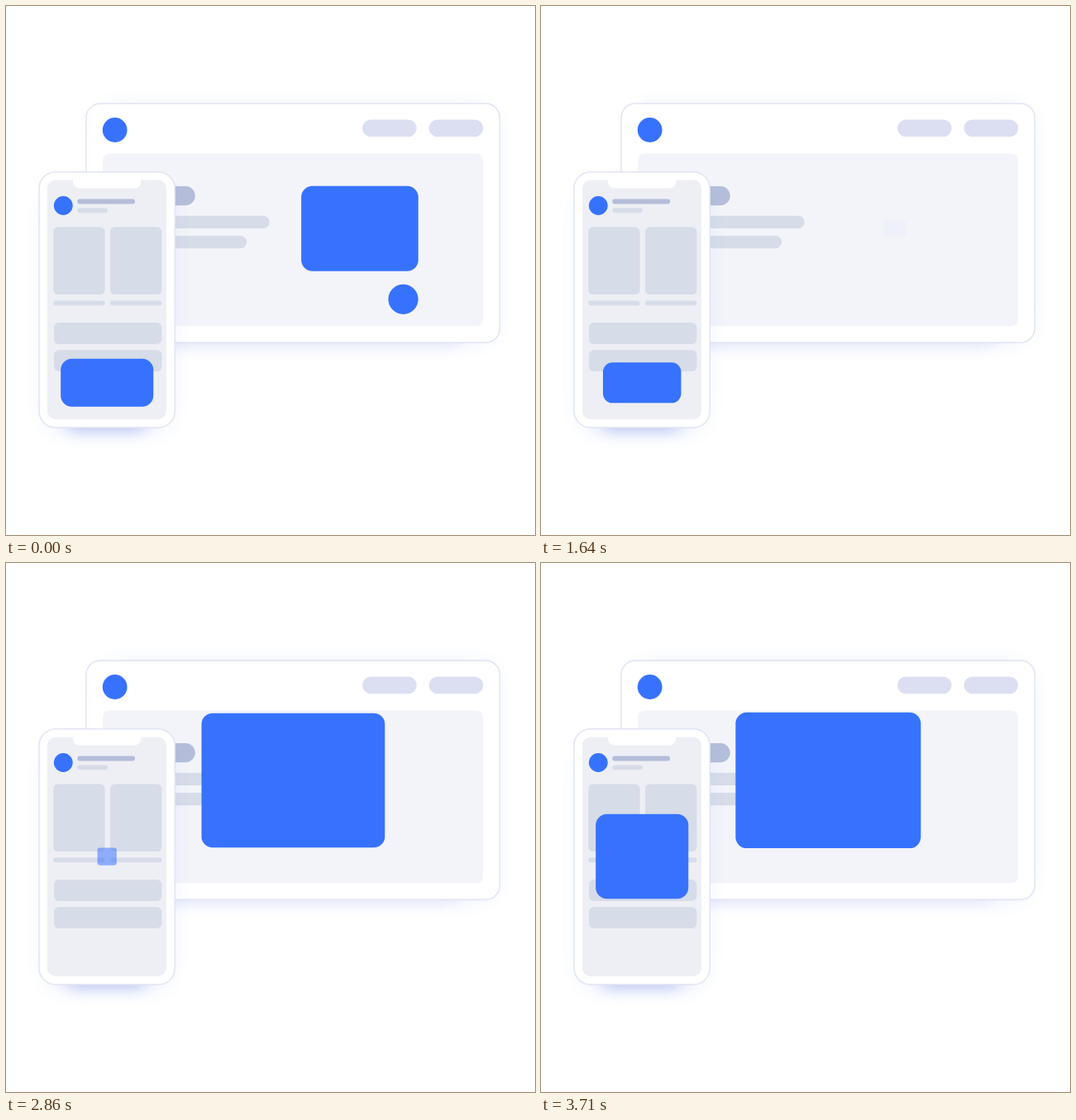
An HTML page for the animation above (8 s loop, 640x640 px).

```html
<!DOCTYPE html>
<html lang="en">
<head>
<meta charset="utf-8">
<title>Responsive widgets</title>
<style>
  html, body { margin: 0; width: 100%; height: 100%; overflow: hidden; background: #fff; }
  svg { display: block; width: 100%; height: 100%; }
  .blue { fill: #3772ff; }
  .dark { fill: #b4bdd9; }
  .mid { fill: #d6dce8; }
  .pill { fill: #dcdff1; }
  .frame { fill: #fff; stroke: #e1e4f4; stroke-width: 1.5; }
</style>
</head>
<body>
<svg viewBox="0 0 640 640">
  <defs>
    <filter id="soft" x="-30%" y="-30%" width="160%" height="160%"><feGaussianBlur stdDeviation="12"/></filter>
    <filter id="near" x="-60%" y="-100%" width="220%" height="300%"><feGaussianBlur stdDeviation="9"/></filter>
  </defs>

  <g id="browser">
    <rect x="110" y="122" width="482" height="284" rx="30" fill="#3d6fe8" opacity=".13" filter="url(#soft)"/>
    <rect x="150" y="385" width="400" height="26" rx="13" fill="#4a62d8" opacity=".1" filter="url(#near)"/>
    <rect class="frame" x="97" y="118" width="500.3" height="289.2" rx="17"/>
    <circle class="blue" cx="131.7" cy="150" r="14.9"/>
    <rect class="pill" x="431.2" y="137.5" width="65.6" height="20.7" rx="10.3"/>
    <rect class="pill" x="511.7" y="137.5" width="65.6" height="20.7" rx="10.3"/>
    <rect x="117" y="178.4" width="460.3" height="208.9" rx="8" fill="#f3f4fa"/>
    <rect class="dark" x="157" y="218" width="71.8" height="23.2" rx="11.6"/>
    <rect class="mid" x="157" y="253.8" width="161.8" height="15.2" rx="7.6"/>
    <rect class="mid" x="157" y="278" width="134.2" height="15.2" rx="7.6"/>
  </g>
  <g id="browserWidgets"></g>

  <g id="phone">
    <rect x="48" y="222" width="150" height="292" rx="28" fill="#3d6fe8" opacity=".14" filter="url(#soft)"/>
    <rect x="74" y="490" width="94" height="24" rx="12" fill="#4a62d8" opacity=".3" filter="url(#near)"/>
    <rect class="frame" x="40" y="200.7" width="164.3" height="309.4" rx="20"/>
    <rect x="50" y="210.5" width="144" height="289.5" rx="10" fill="#eeeff5"/>
    <path d="M81 209.5H163.3V212.5a8 8 0 0 1-8 8H89a8 8 0 0 1-8-8Z" fill="#fff"/>
    <circle class="blue" cx="69.3" cy="241.5" r="11.4"/>
    <rect class="dark" x="86.3" y="233.5" width="69.8" height="6" rx="3"/>
    <rect class="mid" x="86.3" y="244.4" width="36.7" height="5.8" rx="2.9"/>
    <rect class="mid" x="57.3" y="267.6" width="62.3" height="81.5" rx="5.5"/>
    <rect class="mid" x="126.1" y="267.6" width="62.4" height="81.5" rx="5.5"/>
    <rect class="mid" x="57.3" y="356.5" width="62.3" height="5.8" rx="2.9"/>
    <rect class="mid" x="126.1" y="356.5" width="62.4" height="5.8" rx="2.9"/>
    <rect class="mid" x="58" y="383" width="130.5" height="26" rx="6"/>
    <rect class="mid" x="58" y="416.2" width="130.5" height="25.8" rx="6"/>
  </g>
  <g id="phoneWidgets"></g>
</svg>

<script>
const LOOP = 8000;

// Smooth 0..1 progress of t between start and end.
function ease(t, start, end) {
  const p = Math.min(1, Math.max(0, (t - start) / (end - start)));
  return p * p * (3 - 2 * p);
}

// Swell from 1 to the peak, then shrink away while fading.
function leave(swell, shrink, gone, peak, fade) {
  return t => ({
    scale: (1 + (peak - 1) * ease(t, swell, shrink)) * (1 - ease(t, shrink, gone)),
    opacity: 1 - ease(t, ...fade)
  });
}

// Grow from 0 past full size, then settle at 1.
function enter(start, top, settled, peak) {
  return t => ({
    scale: peak * ease(t, start, top) - (peak - 1) * ease(t, top, settled),
    opacity: ease(t, start, start + 290)
  });
}

const widgets = [
  { layer: 'browserWidgets', x: 428, y: 269.3, w: 141.6, h: 103, r: 13.5,
    pose: leave(731, 915, 1915, 1.056, [1375, 1665]) },
  { layer: 'browserWidgets', x: 480.6, y: 354.8, w: 36.2, h: 36.2, r: 18.1,
    pose: leave(480, 685, 1685, 1.06, [1129, 1419]) },
  { layer: 'phoneWidgets', x: 122.25, y: 455.8, w: 112.1, h: 58, r: 13.5,
    pose: leave(1190, 1385, 2285, 1.05, [1700, 1990]) },
  { layer: 'browserWidgets', x: 347.45, y: 262.95, w: 224.1, h: 164.3, r: 13.5,
    pose: enter(2410, 2945, 3390, 1.06) },
  { layer: 'phoneWidgets', x: 122.25, y: 355.05, w: 112.1, h: 102.5, r: 13.5,
    pose: enter(2710, 3240, 3690, 1.05) }
];

for (const widget of widgets) {
  const { w, h, r } = widget;
  const node = document.createElementNS('http://www.w3.org/2000/svg', 'rect');
  const attributes = { class: 'blue', x: -w / 2, y: -h / 2, width: w, height: h, rx: r };
  for (const name in attributes) node.setAttribute(name, attributes[name]);
  document.getElementById(widget.layer).append(node);
  widget.node = node;
}

function render(t) {
  for (const { node, x, y, pose } of widgets) {
    const { scale, opacity } = pose(t);
    node.setAttribute('transform', `translate(${x} ${y}) scale(${scale})`);
    node.setAttribute('opacity', opacity);
  }
}

const began = performance.now();
function tick() {
  render((performance.now() - began) % LOOP);
  requestAnimationFrame(tick);
}
tick();
</script>
</body>
</html>
```
